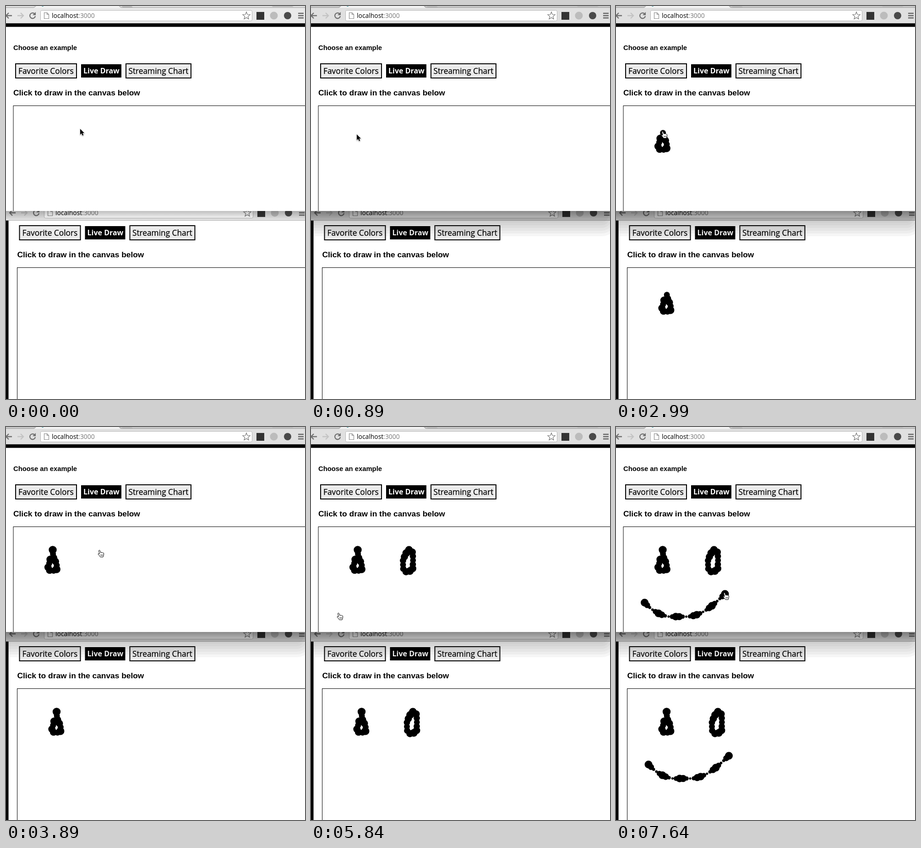
These frames come from a looping animation (653x857 px, 8000 ms). An HTML page:

```html
<!DOCTYPE html>
<html lang="en">
<head>
<meta charset="utf-8">
<title>Live Draw</title>
<style>
  html, body { margin: 0; width: 100%; height: 100%; overflow: hidden; background: #fff; }
  svg { display: block; }
  .ui { font: 17.3px "Open Sans", "Noto Sans", sans-serif; stroke: #000; stroke-width: .25px; }
  .url { font: 13.9px "Open Sans", "Noto Sans", sans-serif; }
  .chosen { font: 700 16px "Open Sans", "Noto Sans", sans-serif; fill: #fff; }
  .small { font: bold 14.8px "Liberation Sans", Arial, sans-serif; }
  .large { font: bold 17.37px "Liberation Sans", Arial, sans-serif; }
</style>
</head>
<body>
<svg id="stage" width="653" height="857" viewBox="0 0 653 857"></svg>
<script>
const LOOP = 8000, STEP = 150, FOCUS_AT = 890, HAND_AT = 1340;
const stage = document.getElementById('stage');

// Periods in which the screen refreshes; it holds still between them.
const ACTIVE = [[150, 150], [450, 890], [1190, 1340], [1940, 3890], [4340, 6140], [6440, 7640]];

// A stroke is a row of evenly spaced dots whose radius swells in a wave along the path.
const STROKES = [
  { from: 1940, to: 3140, ease: .75, count: 11, radius: 7.5, swell: 1.2, period: 2.5,
    path: 'M97 289L91 308Q92 315 110 313L111 299L103 283L102 268' },
  { from: 4340, to: 5390, ease: .55, count: 13, radius: 7.4, swell: 1, period: 6,
    path: 'M208 275L201 289V308Q205 317 212 316L222 311L223 285L221 272L214 268' },
  { from: 6440, to: 7640, ease: .75, count: 27, radius: 5.5, swell: 3, period: 5.2,
    path: 'M62.5 383Q88 410 116 413.5H150Q180 415 213 387L238 364' }
];

// Where the pointer rests between strokes: time, x, y.
const STOPS = [[0, 162, 268], [150, 154, 263], [740, 100, 280], [HAND_AT, 101, 281],
  [3890, 204, 268], [5840, 60, 405], [5990, 48, 396]];

const rect = (x, y, w, h, fill, more = '') =>
  `<rect x="${x}" y="${y}" width="${w}" height="${h}" fill="${fill}" ${more}/>`;
const text = (x, y, cls, words) => `<text x="${x}" y="${y}" class="${cls}">${words}</text>`;
const line = (d, color, width) =>
  `<path d="${d}" fill="none" stroke="${color}" stroke-width="${width}"/>`;
const disc = (x, y, r, fill) => `<circle cx="${x}" cy="${y}" r="${r}" fill="${fill}"/>`;

function star(cx, cy) {
  const points = Array.from({ length: 10 }, (_, i) => {
    const a = i * Math.PI / 5 - Math.PI / 2, r = i % 2 ? 3.7 : 8.5;
    return `${cx + r * Math.cos(a)},${cy + r * Math.sin(a)}`;
  });
  return `<polygon points="${points.join(' ')}" fill="#fff" stroke="#777" stroke-width="1.2"/>`;
}

function toolbar(dx, dy, rightDx, id) {
  const left = `<g transform="translate(${dx} ${dy})">
    ${line('M13 21H1M6 15L0 21L6 27', '#707070', 2.4)}
    ${line('M25 21H37M32 15L38 21L32 27', '#c4c4c4', 2.4)}
    ${line('M62.5 17A6 6 0 1 0 64 22', '#707070', 2.3)}
    <path d="M65 13V20H58Z" fill="#707070"/>
    ${rect(75.5, 9.5, 462 + rightDx - dx, 23, '#fff', 'rx="3" stroke="#b4b4b4"')}
    ${line('M83.5 14.5H89.5L93.5 18.5V27.5H83.5ZM89.5 14.5V18.5H93.5', '#8c8c8c', 1.2)}
    ${text(100, 26, 'url', 'localhost<tspan fill="#777">:3000</tspan>')}</g>`;
  const right = `<g transform="translate(${rightDx} ${dy})">
    ${star(525, 21.5)}
    ${rect(547, 13, 17, 17, '#333')}
    ${disc(585, 21, 8.5, '#bcbcbc')}
    ${disc(615, 21, 8, '#4a4a4a')}
    ${line('M638 16H650M638 21H650M638 26H650', '#666', 2.4)}</g>`;
  return rect(0, dy + 4, 653, 34, '#e4e4e4', `id="${id}"`) + left + right +
    rect(0, dy + 37, 653, 1, '#a8a8a8');
}

function page(dx, dy, id) {
  return `<g transform="translate(${dx} ${dy})">
    ${rect(21, 126, 133, 31, '#ebebeb', 'stroke="#000" stroke-width="2"')}
    ${text(27, 147.5, 'ui', 'Favorite Colors')}
    ${rect(164, 127, 88, 29, '#000')}
    ${text(169, 147, 'chosen', 'Live Draw')}
    ${rect(262, 126, 142, 31, '#ebebeb', 'stroke="#000" stroke-width="2"')}
    ${text(267.5, 147.5, 'ui', 'Streaming Chart')}
    ${text(16, 194.5, 'large', 'Click to draw in the canvas below')}
    ${rect(16, 217.5, 900, 500, 'none', 'stroke="#000"')}
    <g id="${id}"></g></g>`;
}

const fade = (id, color, from, to) => `<linearGradient id="${id}" x2="0" y2="1">
  <stop stop-color="${color}" stop-opacity="${from}"/>
  <stop offset="1" stop-color="${color}" stop-opacity="${to}"/></linearGradient>`;

const bands = Array.from({ length: 6 }, (_, i) =>
  rect(-60, 400, 709 + i * 4, 72 + i * 6, '#000', `rx="${14 + i * 4}" opacity=".034"`)).join('');

stage.innerHTML = `<defs>
    ${fade('soft', '#000', .25, 0)}
    ${fade('deep', '#000', .33, .04)}
  </defs>
  ${rect(0, 0, 653, 857, '#fff')}
  ${page(8.5, 353, 'lowerInk')}
  ${toolbar(8, 430, 2, 'lowerBar')}
  ${rect(0, 468, 5.5, 389, '#000')}
  ${rect(0, 447, 653, 20, 'url(#soft)', 'id="softShadow"')}
  <g id="deepShadow">${bands}${rect(0, 447, 653, 21, 'url(#deep)')}</g>
  <svg width="653" height="447">
    ${rect(0, 0, 653, 447, '#fff')}
    ${rect(0, 0, 653, 5, '#d0d0d0', 'id="tabs"')}
    ${line('M0 3.5H60L66 0M247 0L252 3.5H653', '#a0a0a0', 1)}
    <path d="M61 5L66 0H246L251 5Z" fill="#f3f3f3"/>
    <path d="M252 0H274L277 3H255ZM580 0H625L628 2H583Z" fill="#bbb"/>
    ${disc(80, -1, 2.2, '#2b8a94')}
    ${toolbar(0, 0, 0, 'upperBar')}
    ${rect(0, 38, 653, 7.5, '#000')}
    ${text(16, 96, 'small', 'Choose an example')}
    ${page(0, 0, 'upperInk')}
  </svg>
  <g id="pointer">
    <path id="arrow" d="M0 0V12.5L3 9.8L5 14.5L7.2 13.5L5.2 9H9Z" stroke="#fff" stroke-width="1.2"
      paint-order="stroke" style="filter:drop-shadow(0 1px 1px #0006)"/>
    <g id="hand" stroke="#000" stroke-linejoin="round">
      <path d="M-1.6 1.5Q-.3-.5 1.2 1.4L2.5 6Q4 4.4 5 5.9Q6.6 4.8 7.5 6.5Q9.2 6 9.6 7.8L9.3 11.5L8 15.5H2L-.5 12L-3 9.2Q-2.6 7.4-.5 8.4L.2 9Z" fill="#fff"/>
      <path d="M3 10V13M5 10V13M7 10V13" stroke-width=".8"/>
    </g>
  </g>`;

const part = Object.fromEntries([...stage.querySelectorAll('[id]')].map(el => [el.id, el]));
const inks = [part.upperInk, part.lowerInk];
const show = (el, visible) => el.setAttribute('visibility', visible ? 'visible' : 'hidden');

for (const stroke of STROKES) {
  const curve = document.createElementNS('http://www.w3.org/2000/svg', 'path');
  curve.setAttribute('d', stroke.path);
  const length = curve.getTotalLength();
  stroke.pointAt = k => curve.getPointAtLength(k * length);
  stroke.progress = t =>
    Math.min(1, Math.max(0, (t - stroke.from) / (stroke.to - stroke.from))) ** stroke.ease;
}

const pointerOn = (stroke, t) => {
  const { x, y } = stroke.pointAt(stroke.progress(t));
  return [x - 1, y - 3];
};

const dots = STROKES.flatMap(stroke => Array.from({ length: stroke.count }, (_, i) => {
  const reach = i / (stroke.count - 1), { x, y } = stroke.pointAt(reach);
  const r = stroke.radius + stroke.swell * Math.cos(2 * Math.PI * i / stroke.period);
  return { stroke, reach, shape: disc(x, y, r, '#000') };
}));
for (const ink of inks) ink.innerHTML = dots.map(dot => dot.shape).join('');

const route = [...STOPS, ...STROKES.flatMap(stroke =>
  [stroke.from, stroke.to].map(t => [t, ...pointerOn(stroke, t)]))].sort((a, b) => a[0] - b[0]);

function refreshTime(t) {
  let latest = 0;
  for (const [from, to] of ACTIVE) {
    if (t < from) break;
    const steps = Math.max(1, Math.round((to - from) / STEP));
    const done = Math.min(steps, Math.floor((t - from) / STEP + .07));
    latest = from + (to - from) * done / steps;
  }
  return latest;
}

function pointerAt(t) {
  const stroke = STROKES.find(s => t >= s.from && t <= s.to);
  if (stroke) return pointerOn(stroke, t);
  const next = route.findIndex(stop => stop[0] > t);
  const [t0, x0, y0] = route[next - 1], [t1, x1, y1] = route[next];
  const k = (t - t0) / (t1 - t0);
  return [x0 + (x1 - x0) * k, y0 + (y1 - y0) * k];
}

function update(time) {
  const t = refreshTime(time % LOOP), focused = t >= FOCUS_AT;
  part.upperBar.setAttribute('fill', focused ? '#e0e0e0' : '#e9e9e9');
  part.tabs.setAttribute('fill', focused ? '#c8c8c8' : '#dedede');
  show(part.deepShadow, focused);
  show(part.softShadow, !focused);
  show(part.arrow, t < HAND_AT);
  show(part.hand, t >= HAND_AT);
  const [x, y] = pointerAt(t).map(Math.round);
  part.pointer.setAttribute('transform', `translate(${x} ${y})`);
  dots.forEach(({ stroke, reach }, i) => {
    const drawn = t >= stroke.from && stroke.progress(t) >= reach;
    for (const ink of inks) show(ink.children[i], drawn);
  });
}

const began = performance.now();
function tick() {
  update(performance.now() - began);
  requestAnimationFrame(tick);
}
tick();
</script>
</body>
</html>
```
